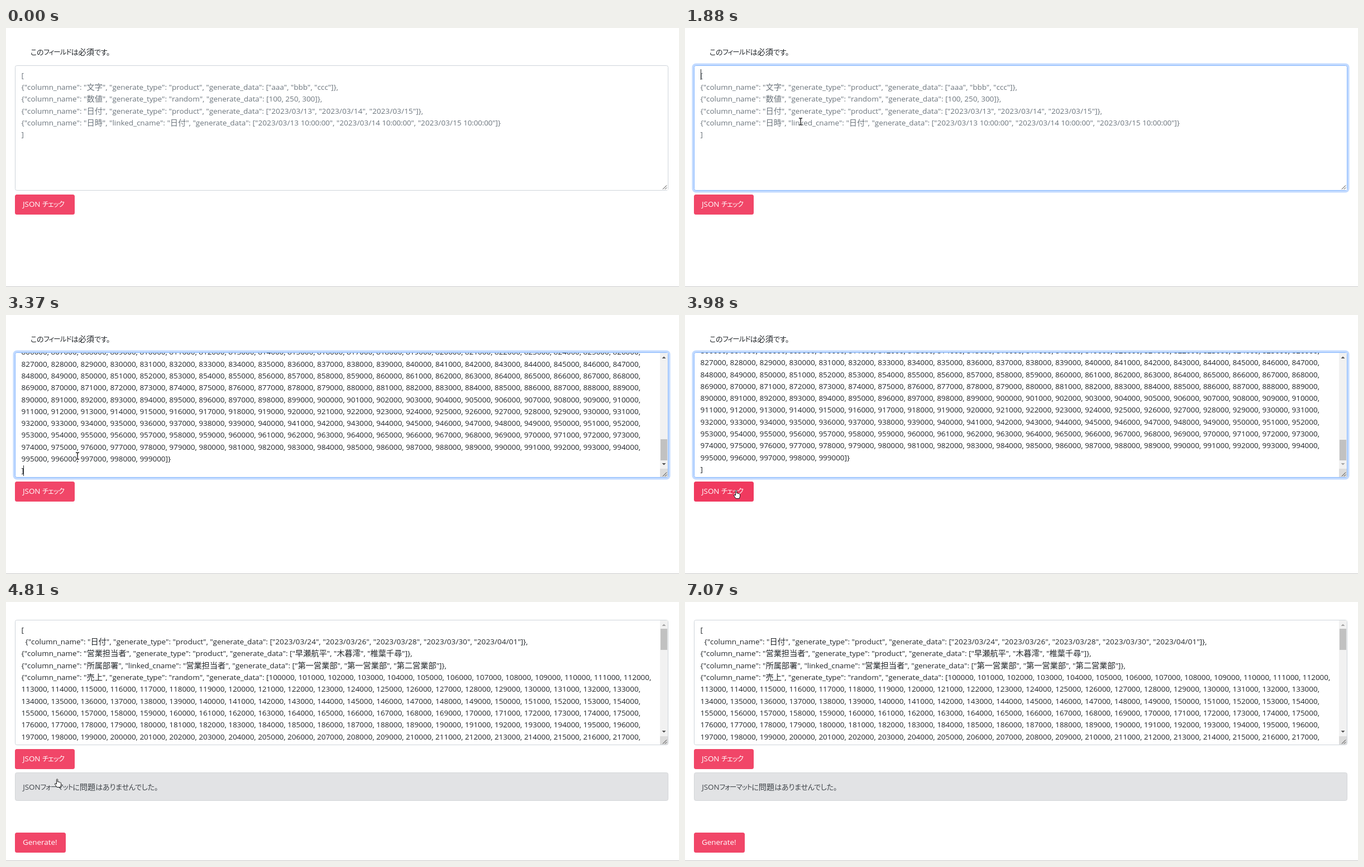
These frames come from a looping animation (1205 px wide and 465 px high, 7400 ms). An HTML page:

```html
<!DOCTYPE html>
<html lang="ja">
<head>
<meta charset="utf-8">
<style>
html, body { margin: 0; width: 100%; height: 100%; overflow: hidden; background: #fff; }
#stage { position: relative; width: 1205px; height: 465px; overflow: hidden;
  font: 13.46px/21.3px "Open Sans", "Noto Sans CJK JP", "Noto Sans CJK", sans-serif; color: #212529; }
#stage div { position: absolute; box-sizing: border-box; white-space: pre; }
#stage span { line-height: 0; font-family: "Noto Sans CJK JP", "Noto Sans CJK", sans-serif; }
#stage .latin, #stage .date, #stage .time { font-family: "Open Sans", sans-serif; }
.latin { letter-spacing: -.03px; }
.date { letter-spacing: .13px; }
.time { letter-spacing: -.18px; }
.kanji { font-size: 14.2px; }
.hira { font-size: 13px; font-feature-settings: "palt"; letter-spacing: -.2px; }
.kata { font-size: 12.4px; font-feature-settings: "palt"; letter-spacing: -.8px; }
#area { left: 16px; width: 1170px; height: 225px; border: 1px solid #ced4da; border-radius: 3.5px; background: #fff; }
#view { left: 0; top: 0; width: 1168px; height: 223px; overflow: hidden; }
.rows { left: 10.6px; top: 6.9px; }
#hint { color: #6c757d; }
#caret { width: 1px; height: 19px; background: #212529; }
#bar { left: 1154px; top: 0; width: 14px; height: 208px; background: #f1f1f1; }
#thumb { left: 1px; width: 12px; height: 37.5px; background: #c1c1c1; }
#corner { left: 1154px; top: 208px; width: 14px; height: 15px; }
#area svg { position: absolute; left: 0; top: 0; }
.button { left: 16px; height: 35.5px; padding: 7.2px 14px; border-radius: 3.5px; background: #f14668; color: #fff; }
#alert { left: 16px; top: 306px; width: 1170px; height: 51px; padding: 14.5px 13.2px; border: 1px solid #d3d6d8;
  border-radius: 3.5px; background: #e2e3e5; color: #41464b; }
#rule { left: 0; top: 464px; width: 1205px; height: 1px; background: #c8c8c8; }
#cursor { position: absolute; left: 0; top: 0; overflow: visible; }
</style>
</head>
<body>
<div id="stage">
  <div id="label" style="left:44px;top:32.5px">このフィールドは必須です。</div>
  <div id="area">
    <div id="view">
      <div id="hint" class="rows"></div>
      <div id="value" class="rows"></div>
      <div id="caret"></div>
    </div>
    <div id="bar">
      <div id="thumb"></div>
      <svg width="14" height="208">
        <path id="up" d="M3.5 10L7 6.5L10.5 10z"/>
        <path id="down" d="M3.5 198L7 201.5L10.5 198z"/>
      </svg>
    </div>
    <div id="corner"><svg width="14" height="15"><path d="M5 13.5L12 6.5M9 13.5L12 10.5" stroke="#333" fill="none"/></svg></div>
  </div>
  <div id="check" class="button" style="width:106.5px">JSON チェック</div>
  <div id="done">
    <div id="alert">JSONフォーマットに問題はありませんでした。</div>
    <div class="button" style="top:414px;width:91px">Generate!</div>
  </div>
  <div id="rule"></div>
  <svg id="cursor" width="1" height="1">
    <g id="beam" fill="none">
      <path d="M-3 -6H3M0 -6V6M-3 6H3" stroke="#fff" stroke-width="3"/>
      <path d="M-3 -6H-1L0 -5L1 -6H3M0 -5V5M-3 6H-1L0 5L1 6H3" stroke="#222" stroke-width="1.4"/>
    </g>
    <path id="hand" fill="#fff" stroke="#111" stroke-linejoin="round"
      d="M-2.5 2V-6.5Q-1.5 -8.2 -.4 -6.5V-2Q1 -3 2 -1.5Q3.5 -2.2 4.2 -.8Q5.6 -1 5.6 .7V3.5L4.2 7.5H-2L-5.5 2.2Q-5.4 .2 -4 .9z"/>
    <path id="arrow" fill="#fff" stroke="#111" stroke-linejoin="round"
      d="M.5 .5V13L3.4 10.3L5.3 14.6L7.3 13.7L5.4 9.6H9.5z"/>
  </svg>
</div>
<script>
const $ = id => document.getElementById(id);
const show = (id, on) => $(id).style.display = on ? '' : 'none';

// Each kind of run has its own size and spacing.
const RUNS = new RegExp([
  '(?<latin>[A-Za-z_]+)', '(?<date>\\d+/[\\d/]+)', '(?<time>\\d+:[\\d:]+)',
  '(?<kanji>[\\u3400-\\u9fff]+)', '(?<hira>[\\u3001-\\u309f]+)', '(?<kata>[\\u30a0-\\u30ff]+)'].join('|'), 'g');
const styled = text => text.replace(RUNS, (run, ...rest) => {
  const groups = rest.pop();
  return `<span class="${Object.keys(groups).find(k => groups[k])}">${run}</span>`;
});
const quote = list => list.map(s => `"${s}"`).join(', ');
const column = (name, key, kind, data) =>
  `{"column_name": "${name}", "${key}": "${kind}", "generate_data": [${data}`;
const fill = (id, lines) => $(id).innerHTML = lines.map((line, i) =>
  `<div style="top:${i * 21.3}px">${styled(line)}</div>`).join('');
const numbers = (from, to) => Array.from({length: to - from + 1}, (_, i) => (from + i) * 1000).join(', ');

const days = ['2023/03/13', '2023/03/14', '2023/03/15'];
fill('hint', ['[',
  column('文字', 'generate_type', 'product', quote(['aaa', 'bbb', 'ccc'])) + ']},',
  column('数値', 'generate_type', 'random', '100, 250, 300') + ']},',
  column('日付', 'generate_type', 'product', quote(days)) + ']},',
  column('日時', 'linked_cname', '日付', quote(days.map(d => d + ' 10:00:00'))) + ']}',
  ']']);

const lines = ['[',
  '  ' + column('日付', 'generate_type', 'product',
    quote(['03/24', '03/26', '03/28', '03/30', '04/01'].map(d => '2023/' + d))) + ']},',
  column('営業担当者', 'generate_type', 'product', quote(['早瀬航平', '木暮澪', '椎葉千尋'])) + ']},',
  column('所属部署', 'linked_cname', '営業担当者', quote(['第一営業部', '第一営業部', '第二営業部'])) + ']},',
  column('売上', 'generate_type', 'random', numbers(100, 112)) + ','];
for (let n = 113; n < 1000; n += 21)
  lines.push(numbers(n, Math.min(n + 20, 999)) + (n + 20 < 999 ? ',' : ']}'));
lines.push(']');
fill('value', lines);
document.querySelectorAll('#label, .button, #alert').forEach(el => el.innerHTML = styled(el.textContent));

const LOOP = 7400, PASTE = 2010, CLICK = 4600, RESULT = 4800, MAX_SCROLL = 830.4;
// Pointer path: time, x, y
const path = [[130, 1160, 284], [830, 207, 168], [2730, 207, 168], [3160, 128, 253], [3500, 128, 253],
  [3950, 93, 322], [4180, 93, 322], [4250, 93, 325], [5590, 93, 325], [5930, 188, 366],
  [6390, 188, 366], [7070, 1128, 470]];
const clamp = v => Math.max(0, Math.min(1, v));

function pointer(t) {
  const i = Math.max(1, path.findIndex(k => k[0] > t));
  const [a, b] = [path[i - 1], path[i]];
  const p = clamp((t - a[0]) / (b[0] - a[0])), e = p * p * (3 - 2 * p);
  return [a[1] + (b[1] - a[1]) * e, a[2] + (b[2] - a[2]) * e];
}

function draw(t) {
  const pasted = t >= PASTE, result = t >= RESULT;
  const scroll = !pasted || result ? 0 : t < 3300 ? 824 : t < 3370 ? 825.6 : t < 3440 ? 828 : MAX_SCROLL;
  const focus = Math.min(clamp((t - 830) / 130), clamp(1 - (t - CLICK) / 150));
  const mix = (a, b) => a + (b - a) * focus;

  $('area').style.top = (result ? 32 : 67) + 'px';
  $('area').style.borderColor = `rgb(${mix(206, 134)},${mix(212, 183)},${mix(218, 254)})`;
  $('area').style.boxShadow = `0 0 0 3.5px rgba(13,110,253,${.25 * focus})`;
  show('hint', !pasted);
  show('value', pasted);
  show('bar', pasted);
  $('value').style.top = 6.9 - scroll + 'px';
  $('thumb').style.top = 15 + 140.5 * scroll / MAX_SCROLL + 'px';
  $('up').style.fill = scroll ? '#505050' : '#a3a3a3';
  $('down').style.fill = scroll < MAX_SCROLL ? '#505050' : '#a3a3a3';
  $('corner').style.background = pasted ? '#dcdcdc' : '#fff';

  const blinkStart = pasted ? PASTE : 815;
  show('caret', t >= 890 && t < CLICK && Math.floor((t - blinkStart) / 530) % 2 === 0);
  $('caret').style.left = (pasted ? 14 : 11) + 'px';
  $('caret').style.top = Math.round(pasted ? 1029.5 - scroll : 6) + 'px';

  const [x, y] = pointer(t);
  const kind = t >= 5590 ? 'arrow' : y > 296 ? 'hand' : 'beam';
  ['beam', 'hand', 'arrow'].forEach(id => show(id, id === kind && t >= 130 && t < 7070));
  $('cursor').style.transform = `translate(${x}px,${y}px)`;

  $('check').style.top = (result ? 264 : 299) + 'px';
  $('check').style.background = kind === 'hand' && !result ? '#f03a5f' : '#f14668';
  show('label', !result);
  show('done', result);
}

const start = performance.now();
function tick() {
  draw((performance.now() - start) % LOOP);
  requestAnimationFrame(tick);
}
tick();
</script>
</body>
</html>
```
